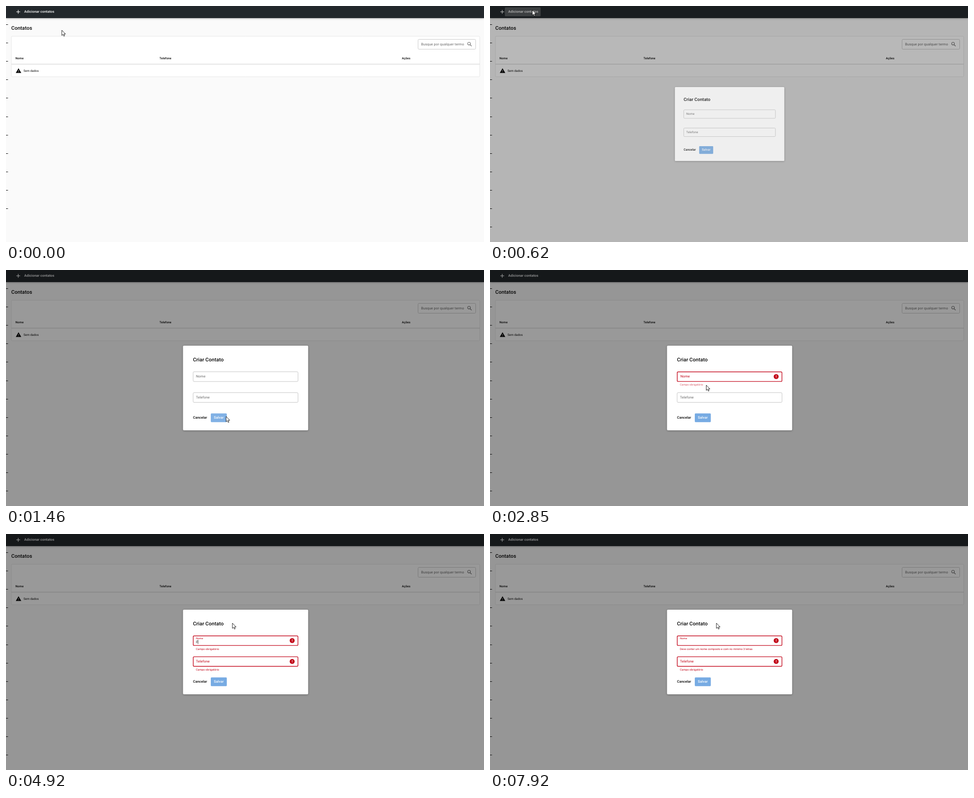
An HTML page with a canvas for the animation above (8 s loop, 1062 px wide and 527 px high).

```html
<!DOCTYPE html>
<html lang="pt">
<head>
<meta charset="utf-8">
<title>Contatos</title>
<style>
html, body { margin: 0; width: 100%; height: 100%; overflow: hidden; background: #fafafa; }
canvas { display: block; }
</style>
</head>
<body>
<canvas id="stage" width="1062" height="527"></canvas>
<script>
const W = 1062, H = 527, LOOP = 8000, FPS = 13;
const stage = document.getElementById('stage').getContext('2d');
const layer = new OffscreenCanvas(W, H).getContext('2d');
let ctx = stage;

const RED = '#c10015', BLUE = '#1976d2', GREY = 'rgba(0,0,0,.6)';
const UNIT = .553; // page zoom
const BODY = 14 * UNIT, SMALL = 12 * UNIT, HINT = 11 * UNIT, TITLE = 20.3 * UNIT;

const WARNING = new Path2D('M1 21h22L12 2zm12-3h-2v-2h2zm0-4h-2v-4h2z');
const LENS = new Path2D('M13.5 13.5l6.3 6.3M15 9.5a5.5 5.5 0 1 1-11 0a5.5 5.5 0 1 1 11 0');
const ARROW = new Path2D('M0 0V11.8L2.7 9.3 4.5 13.4 6.4 12.6 4.7 8.6H8.2Z');

// Cursor moves: start, end, x, y
const MOVES = [[80, 380, 94, 9], [620, 1460, 489, 327], [1620, 1920, 478, 236],
  [2230, 3230, 482, 270], [3230, 3540, 482, 319], [3620, 3850, 490, 243], [3920, 4620, 503, 199]];
const WORD = 'Finotan';
const NAME = { y: 227, label: 'Nome', focus: [[1920, 2526], [4000, LOOP]], error: 2526 };
const PHONE = { y: 273.6, label: 'Telefone', focus: [[3310, 3590]], error: 3590 };

const ramp = (t, start, length) => Math.max(0, Math.min(1, (t - start) / length));
const smooth = p => p * p * (3 - 2 * p);
const steep = p => p ** 4 / (p ** 4 + (1 - p) ** 4);

function pointer(t) {
  let x = 124, y = 54;
  for (const [start, end, toX, toY] of MOVES) {
    const p = ramp(t, start, end - start);
    x += (toX - x) * p;
    y += (toY - y) * p;
  }
  return { x, y };
}

function letters(t) {
  if (t >= 7690) return Math.max(0, 4 - Math.floor((t - 7690) / 57));
  if (t >= 7230) return 6;
  if (t >= 5310) return Math.min(7, 2 + Math.floor((t - 5310) / 185));
  return t >= 4770 ? 1 : 0;
}

function text(s, x, y, size, color = '#000', weight = 400) {
  ctx.font = `${weight} ${size}px Roboto, sans-serif`;
  ctx.letterSpacing = size * .01 + 'px';
  ctx.textRendering = 'geometricPrecision';
  ctx.fillStyle = color;
  ctx.fillText(s, x, y);
}

function rect(x, y, w, h, color) {
  ctx.fillStyle = color;
  ctx.fillRect(x, y, w, h);
}

function box(x, y, w, h, r, fill, stroke, line = 1) {
  ctx.beginPath();
  ctx.roundRect(x, y, w, h, r);
  if (fill) { ctx.fillStyle = fill; ctx.fill(); }
  if (stroke) { ctx.strokeStyle = stroke; ctx.lineWidth = line; ctx.stroke(); }
}

function at(x, y, scale, draw) {
  ctx.save();
  ctx.translate(x, y);
  ctx.scale(scale, scale);
  draw();
  ctx.restore();
}

function shadowed(draw) {
  ctx.save();
  ctx.shadowColor = 'rgba(0,0,0,.3)';
  ctx.shadowBlur = 4;
  ctx.shadowOffsetY = 1;
  draw();
  ctx.restore();
}

function header(t) {
  shadowed(() => rect(0, -10, W, 37, '#23282c'));
  if (t >= 230) {
    const glow = t < 620 ? .04 : .22 * (1 - ramp(t, 620, 230));
    box(33, 3, 79.5, 20, 1.7, `rgba(255,255,255,${glow})`);
    if (t >= 540 && t < 620) box(80, 3, 24, 20, 3, 'rgba(255,255,255,.08)');
  }
  rect(23, 12.4, 8.4, 1.2, '#fff');
  rect(26.6, 8.8, 1.2, 8.4, '#fff');
  text('Adicionar contatos', 40.5, 15.2, BODY, '#fff', 500);
}

function page(t) {
  rect(0, 0, W, H, '#fafafa');
  header(t);
  text('Contatos', 11.7, 53.3, TITLE, '#000', 500);

  box(12, 67.5, 1040.5, 90.5, 2, '#fff', '#e6e6e6');
  box(915.5, 74.5, 128, 22, 2.2, null, '#c8c8c8');
  text('Busque por qualquer termo', 922.2, 88, BODY, GREY);
  at(1023.5, 78.8, UNIT, () => {
    ctx.strokeStyle = '#666';
    ctx.lineWidth = 2;
    ctx.stroke(LENS);
  });

  text('Nome', 21, 119, SMALL, '#000', 500);
  text('Telefone', 341, 119, SMALL, '#000', 500);
  text('Ações', 879.5, 119, SMALL, '#000', 500);
  rect(12, 129, 1041, 1.6, '#dedede');
  at(21.2, 137.8, UNIT, () => {
    ctx.fillStyle = '#000';
    ctx.fill(WARNING);
  });
  text('Sem dados', 38.9, 147, SMALL);

  const ticks = t < 80 ? 11 : 12;
  for (let i = 0; i < ticks; i++) rect(0, Math.floor(41.3 + 41.15 * i), 4.5, 1, '#000');
}

function hint(s, y, p) {
  const e = steep(p);
  ctx.globalAlpha = e;
  text(s, 422, y - 2.8 * (1 - e), HINT, RED);
  ctx.globalAlpha = 1;
}

function field({ y, label, focus, error }, t, mouse) {
  const focused = focus.some(([from, to]) => t >= from && t < to);
  const wrong = t >= error;
  const hover = mouse.x > 415 && mouse.x < 649 && mouse.y > y && mouse.y < y + 22;
  const color = wrong ? RED : focused ? BLUE : GREY;
  if (wrong || focused) box(416, y + .5, 232.6, 21.4, 2, null, color, 1.4);
  else box(415.8, y + .2, 233, 21.8, 2.2, null, hover ? '#000' : '#c2c2c2');

  let lift = 0;
  for (const [from, to] of focus) lift += smooth(ramp(t, from, 360)) - smooth(ramp(t, to, 360));
  const p = ramp(t, error, 360);
  const shake = p < 1 ? -1.1 * p * Math.cos(10 * Math.PI * p) : 0;
  text(label, 422 + shake, y + 12.9 - 4.7 * lift, BODY * (1 - .25 * lift), color);

  if (wrong) {
    box(630.3, y + 5.5, 11, 11, 5.5, RED);
    rect(635.2, y + 8.2, 1.2, 3.4, '#fff');
    rect(635.2, y + 12.7, 1.2, 1.2, '#fff');
  }
}

function typed(t) {
  const s = WORD.slice(0, letters(t));
  text(s, 422, 243.5, BODY, 'rgba(0,0,0,.87)');
  const blinkedOff = Math.floor((t - 6230) / 535) === 1;
  if (s && !blinkedOff) rect(Math.floor(422 + ctx.measureText(s).width), 236.5, .8, 9, '#000');
}

function dialog(t, mouse) {
  shadowed(() => box(393.3, 169, 278, 189, 2.2, '#fff'));
  text('Criar Contato', 415.5, 204.2, TITLE, '#000', 500);
  field(NAME, t, mouse);
  field(PHONE, t, mouse);

  const swap = ramp(t, 4850, 600);
  hint('Campo obrigatório', 258.7, ramp(t, NAME.error, 600) - swap);
  hint('Deve conter um nome composto e com no mínimo 3 letras', 258.7, swap);
  hint('Campo obrigatório', 305.3, ramp(t, PHONE.error, 600));
  typed(t);

  const hover = mouse.x > 455 && mouse.x < 491 && mouse.y > 320 && mouse.y < 340;
  text('Cancelar', 415.5, 331.9, BODY, '#000', 500);
  box(455, 320.2, 35.6, 19.6, 1.7, hover ? '#81b1e5' : '#77abe3');
  text('Salvar', 461.8, 331.9, BODY, '#fff', 500);
}

// The dialog is drawn opaque on its own layer, then faded in as a whole
function overlay(t, mouse) {
  rect(0, 0, W, H, `rgba(0,0,0,${.4 * ramp(t, 427, 276)})`);
  const open = 1 - (1 - ramp(t, 407, 330)) ** 2;
  layer.clearRect(0, 0, W, H);
  ctx = layer;
  at(532.4 * (1 - open), 263.5 * (1 - open), open, () => dialog(t, mouse));
  ctx = stage;
  ctx.globalAlpha = open ** 1.7;
  ctx.drawImage(layer.canvas, 0, 0);
  ctx.globalAlpha = 1;
}

function render(t) {
  const mouse = pointer(t);
  page(t);
  if (t >= 540) overlay(t, mouse);
  at(mouse.x, mouse.y, 1, () => {
    ctx.fillStyle = '#fff';
    ctx.strokeStyle = '#000';
    ctx.lineWidth = .9;
    ctx.fill(ARROW);
    ctx.stroke(ARROW);
  });
}

const start = performance.now();
function loop() {
  const t = (performance.now() - start) % LOOP;
  const step = Math.floor((Math.floor(t / 10) * 10 + 4.99) * FPS / 1000);
  render(Math.round(step * 100 / FPS) * 10);
  requestAnimationFrame(loop);
}
loop();
</script>
</body>
</html>
```
